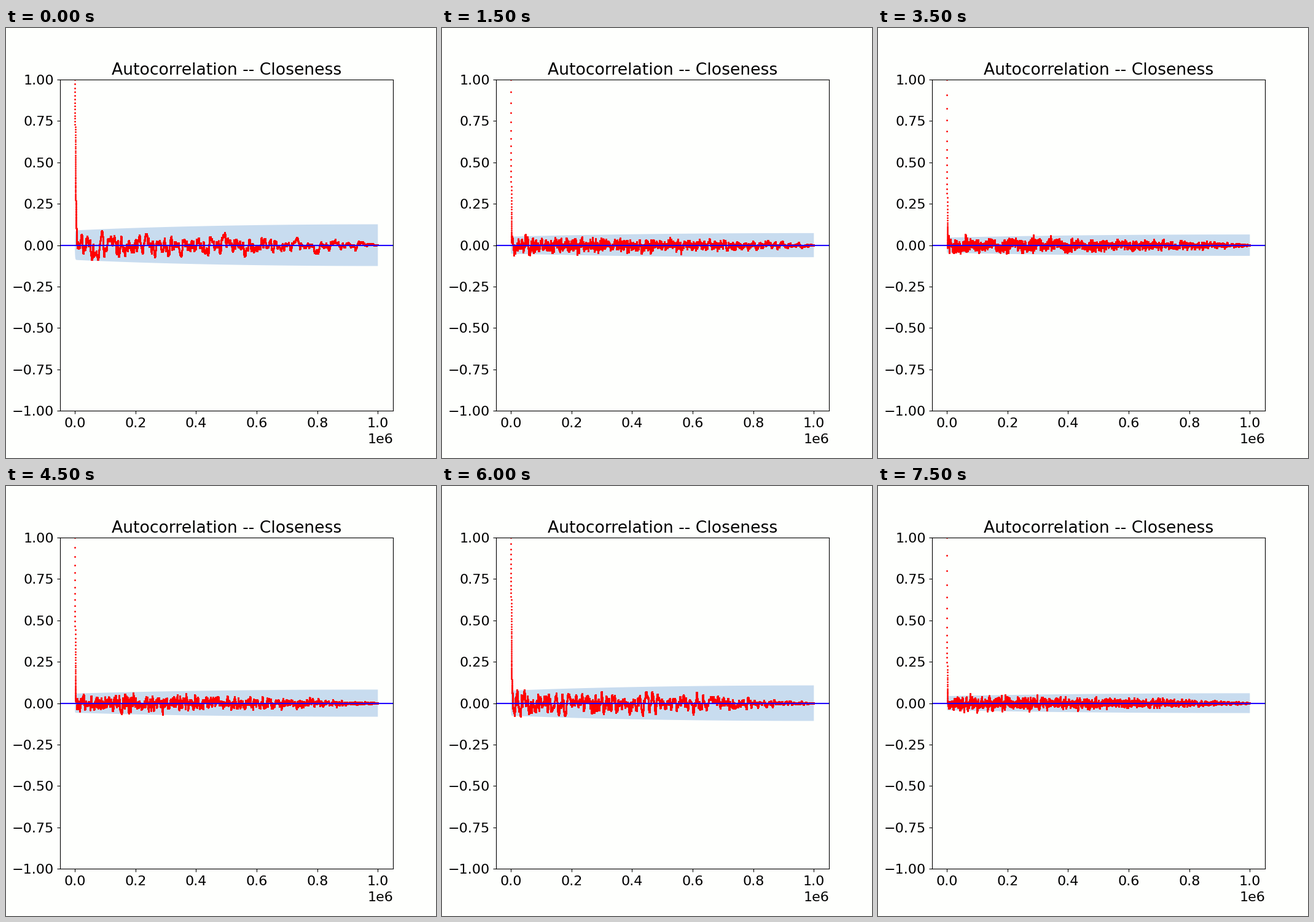
These frames come from a looping animation (700 by 700 pixels, 8 s). A matplotlib script:

```python
import numpy as np
import matplotlib.pyplot as plt
from matplotlib.animation import FuncAnimation
from matplotlib.patches import Polygon

N = 20000            # samples per chain
STEP = 50            # chain steps between samples
NOISE_LIMIT = 0.1
PAPER = "#fefffd"
LAG = np.arange(N)

# First-lag correlation of each chain, one per frame.
RHO = [.9735, .954, .937, .925, .967, .946, .925, .906,
       .967, .940, .911, .906, .964, .9395, .9135, .892]


def sample_acf(rho, rng):
    """Sample autocorrelation of a simulated AR(1) chain."""
    omega = 2 * np.pi * np.arange(N // 2 + 1) / N
    spectrum = np.fft.rfft(rng.standard_normal(N))
    x = np.fft.irfft(spectrum / (1 - rho * np.exp(-1j * omega)), N)
    x -= x.mean()
    acf = np.fft.irfft(np.abs(np.fft.rfft(x, 2 * N)) ** 2)[:N]
    return acf / acf[0]


def chain(index):
    """Autocorrelation and Bartlett 95 % half-width of one chain."""
    rho = RHO[index]
    decay = rho ** (LAG ** 0.97)
    noise = sample_acf(rho, np.random.default_rng(index)) - rho**LAG
    noise = NOISE_LIMIT * np.tanh(noise / NOISE_LIMIT)
    acf = decay + noise * (1 - decay)

    spread = (2 * np.sum(decay**2) - 1) / N
    squares = decay**2 + spread * (1 - LAG / N)
    squares[0] = 0
    half = 1.96 * np.sqrt((1 + 2 * np.cumsum(squares)) / N)
    return acf, half


plt.rcParams.update({"font.family": "DejaVu Sans", "font.size": 16})
fig, ax = plt.subplots(figsize=(7, 7), dpi=100, facecolor=PAPER)
ax.set_facecolor(PAPER)
ax.set_title("Autocorrelation -- Closeness")
ax.set_xlim(-50000, 1050000)
ax.set_ylim(-1, 1)
ax.set_xticks(np.arange(6) * 200000)
ax.set_yticks(np.linspace(-1, 1, 9))
ax.tick_params(axis="x", pad=4.2)
ax.xaxis.OFFSETTEXTPAD = 4.5

steps = LAG * STEP
band = ax.add_patch(Polygon([(0, 0), (1, 0), (1, 1)], fc="#c8dcef", lw=0))
dots, = ax.plot([], [], "o", color="red", ms=1, mew=1)
ax.axhline(0, color="#1f00ff", lw=1.5, zorder=2.2)

chains = [chain(i) for i in range(len(RHO))]


def draw(index):
    acf, half = chains[index]
    x, half = steps[1:], half[1:]
    band.set_xy(np.column_stack([np.r_[x, x[::-1]], np.r_[half, -half[::-1]]]))
    dots.set_data(steps, acf)
    return band, dots


anim = FuncAnimation(fig, draw, frames=len(RHO), interval=500,
                     repeat=True, repeat_delay=0)
plt.show()
```
